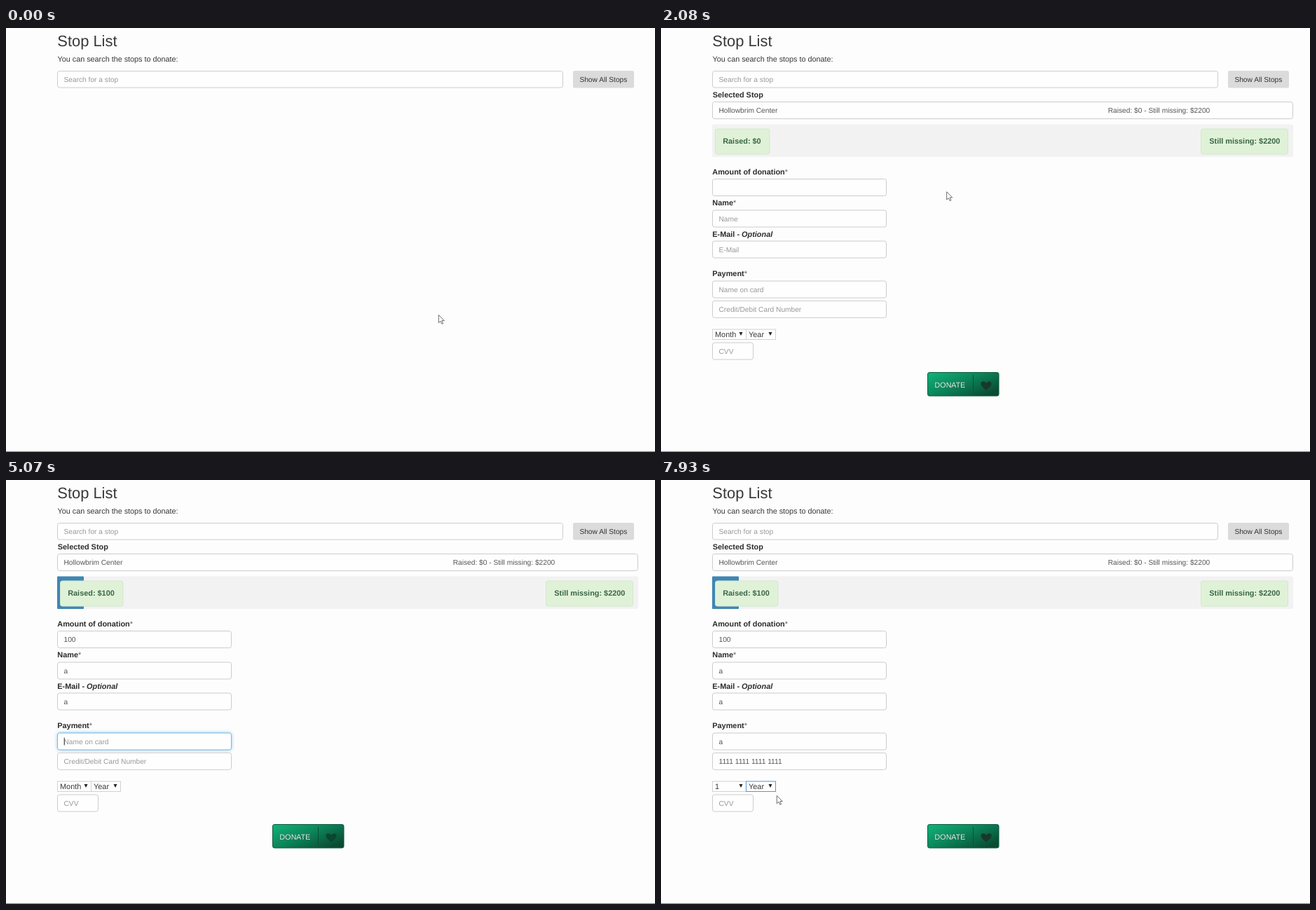
These frames come from a looping animation (926x605 px, 8 s). An HTML page:

```html
<!DOCTYPE html>
<html lang="en">
<head>
<meta charset="utf-8">
<title>Stop List</title>
<style>
  html, body { margin: 0; width: 100%; height: 100%; overflow: hidden; background: #fdfdfd; }
  svg { display: block; width: 926px; height: 605px; }
  text {
    font: 10.9px "Liberation Sans", Arial, sans-serif; fill: #383838;
    white-space: pre; text-rendering: geometricPrecision;
  }
  .title { font-size: 21.9px; }
  .lead { font-size: 10.82px; }
  .small { font-size: 10.2px; fill: #555; }
  .hint { font-size: 10.2px; fill: #999; }
  .bold { font-weight: bold; fill: #2c2c2c; }
  .star { font-weight: normal; fill: #54606c; }
  .badge { font-weight: bold; fill: #3b6446; }
  .field { fill: #fefefe; stroke: #ccc; }
  .field.focus { stroke: #74bbda; filter: drop-shadow(0 0 2.5px rgba(102, 175, 233, .65)); }
  .select { fill: #fefefe; stroke: #d2d2d2; }
  .select.focus { stroke: #5b95cf; }
  .donate { font-size: 10.7px; }
</style>
</head>
<body>
<svg id="stage" viewBox="0 0 926 605">
  <defs>
    <linearGradient id="green" x1="0" y1="0" x2="1" y2=".75">
      <stop offset="0" stop-color="#0fb47a"/>
      <stop offset=".5" stop-color="#0c855b"/>
      <stop offset="1" stop-color="#0a4b33"/>
    </linearGradient>
  </defs>
</svg>
<script>
const LOOP = 8000, STEP = 130;
const ROW_TOP = 85.5, ROW_HEIGHT = 34.93;
const SHOW_LIST = 650, BLUR_BUTTON = 1560, SHOW_FORM = 1690;

const stops = [
  ["Velto at Darnwel Blvd", 1200], ["Thornwick Center Mall", 1400],
  ["Torvena Textile", 1100], ["Calveron Orlenta", 1700],
  ["Hollowbrim Center", 2200], ["Selvio Arts Center", 3100],
  ["Far View Orlenta", 2500], ["Brindellow Park", 700],
  ["Foltrune Plaza", 1900], ["Amber Orbane Market", 2700]
];
const chosen = stops[4];

const stage = document.getElementById("stage");

function add(parent, tag, attrs = {}, content = "") {
  const node = document.createElementNS("http://www.w3.org/2000/svg", tag);
  for (const key in attrs) node.setAttribute(key, attrs[key]);
  node.textContent = content;
  parent.append(node);
  return node;
}
const label = (parent, x, y, content, cls = "", anchor = "start") =>
  add(parent, "text", { x, y, class: cls, "text-anchor": anchor }, content);
const box = (parent, left, top, right, bottom, attrs) =>
  add(parent, "rect", { x: left, y: top, width: right - left, height: bottom - top, ...attrs });
const show = (node, on) => node.setAttribute("visibility", on ? "visible" : "hidden");
const summary = missing => `Raised: $0 - Still missing: $${missing}`;
const rowTop = i => ROW_TOP + i * ROW_HEIGHT;

// Header
label(stage, 73.3, 25.7, "Stop List", "title");
label(stage, 73.5, 47.8, "You can search the stops to donate:", "lead");
box(stage, 73.5, 61.5, 794.5, 85, { rx: 3, class: "field" });
label(stage, 82.5, 76.7, "Search for a stop", "hint");
box(stage, 809, 61, 896, 85.5, { rx: 2.5, fill: "#dbdbdb" });
const showAllRing = box(stage, 808.5, 60.5, 896.5, 85.5, { rx: 1, fill: "#dadada", stroke: "#86aedb" });
label(stage, 852.4, 76.7, "Show All Stops", "small", "middle").style.fill = "#333";
box(stage, 0, 604, 926, 605, { fill: "#7d7d7d" });

// Stop list
const list = add(stage, "g");
box(list, 73.5, 85.5, 901.5, 434.7, { rx: 3, fill: "none", stroke: "#ddd" });
for (let i = 1; i < stops.length; i++) {
  const y = Math.round(rowTop(i));
  box(list, 74, y, 901.5, y + 1, { fill: "#ddd" });
}
const hover = box(list, 74, 0, 901.5, 35, { fill: "#afdce2" });
stops.forEach(([name, missing], i) => {
  label(list, 85, rowTop(i) + 18.3, name);
  label(list, 781.7, rowTop(i) + 15.9, summary(missing), "", "end");
});

// Donation form
const form = add(stage, "g");
label(form, 73.8, 99.4, "Selected Stop", "bold");
box(form, 73.5, 105.5, 901.5, 129.5, { rx: 3, class: "field" });
label(form, 82.5, 121.3, chosen[0], "small");
label(form, 637.7, 121.3, summary(chosen[1]), "small");

box(form, 73, 137.5, 902, 184, { rx: 2, fill: "#f2f2f2" });
const bar = box(form, 73, 137.5, 73, 184, { rx: 1, fill: "#3f86b5" });
const badgeStyle = { rx: 3, fill: "#dff2d7", stroke: "#d3e8ca" };
const raisedBadge = box(form, 77.5, 144, 155, 180, badgeStyle);
const raisedText = label(form, 88.2, 165.4, "", "badge");
box(form, 770.5, 144, 894.5, 180, badgeStyle);
label(form, 782.3, 165.4, `Still missing: $${chosen[1]}`, "badge");

function heading(y, content, extra, attrs) {
  const node = label(form, 73.3, y, content, "bold");
  add(node, "tspan", attrs, extra);
}
const star = { class: "star" };
heading(209, "Amount of donation", "*", star);
heading(253.4, "Name", "*", star);
heading(297.8, "E-Mail - ", "Optional", { "font-style": "italic" });
heading(354.4, "Payment", "*", star);

const digits = n => "1".repeat(n).replace(/(.{4})(?=.)/g, "$1 ");
const typedCard = Array.from({ length: 16 }, (_, i) => [5980 + i * 60, digits(i + 1)]);

// Each field: top edge, hint, time of focus and blur, typed values by time
const fields = [
  { top: 215.5, hint: "", from: 2600, to: 3770, typed: [[3120, "1"], [3380, "10"], [3510, "100"]] },
  { top: 260, hint: "Name", from: 3770, to: 4160, typed: [[3900, "a"]] },
  { top: 304, hint: "E-Mail", from: 4160, to: 4940, typed: [[4550, "a"]] },
  { top: 361, hint: "Name on card", from: 4940, to: 5590, typed: [[5330, "a"]] },
  { top: 389.3, hint: "Credit/Debit Card Number", from: 5590, to: 7020, typed: typedCard },
  { top: 449, hint: "CVV", from: LOOP, to: LOOP, typed: [], right: 131.5 }
];
for (const f of fields) {
  f.rect = box(form, 73.5, f.top, f.right || 321.5, f.top + 24, { rx: 3 });
  f.text = label(form, 82.5, f.top + 15.6, "");
}
const caret = add(form, "rect", { width: 1, height: 11, fill: "#333" });

function select(left, right, content) {
  const rect = box(form, left, 430, right, 444.5);
  const text = label(form, left + 3.5, 441, content);
  add(form, "path", { d: `M${right - 10} 434h5l-2.5 5z`, fill: "#222" });
  return { rect, text };
}
const month = select(73.5, 121.5, "Month");
const year = select(121.5, 163.5, "Year");

box(form, 380.5, 491.5, 482, 525, { rx: 2.5, fill: "url(#green)", stroke: "#0b5a3e" });
box(form, 445, 495, 446, 522, { fill: "#0a5138" });
label(form, 391.3, 513.3, "DONATE", "donate").style.fill = "#0a4a33";
label(form, 390.6, 512.6, "DONATE", "donate").style.fill = "#f2fbf6";
const heart = add(form, "path", {
  d: "M464 517C460 513 456.5 511 456.5 507.5C456.5 503.5 462 503 464 507C466 503 471.5 503.5 471.5 507.5C471.5 511 468 513 464 517Z"
});

// Pointer
const arrow = add(stage, "path", {
  d: "M0 0V11.3L2.7 8.9L4.5 12.9L6.3 12.1L4.5 8.2H8Z",
  fill: "#fff", stroke: "#4a4a4a", "stroke-width": .8
});
const beam = add(stage, "path", { d: "M-2 0H2M0 0V12M-2 12H2", fill: "none", stroke: "#333" });

const pointerKeys = [
  [0, 617.3, 409.4], [520, 850, 73], [650, 850, 73], [910, 693.3, 204.2],
  [1300, 610.3, 246.4], [1820, 610.3, 246.4], [2340, 205, 221], [7540, 205, 221],
  [7670, 190, 330], [7930, 165.3, 450.4]
];

function pointerAt(t) {
  const i = Math.max(1, pointerKeys.findIndex(k => k[0] >= t));
  const [t0, x0, y0] = pointerKeys[i - 1], [t1, x1, y1] = pointerKeys[i];
  const p = (t - t0) / (t1 - t0), e = p * p * (3 - 2 * p);
  return { x: x0 + (x1 - x0) * e, y: y0 + (y1 - y0) * e };
}

function latest(entries, t, initial) {
  return entries.reduce((value, [at, next]) => at <= t ? next : value, initial);
}

function drawFields(t) {
  show(caret, false);
  for (const f of fields) {
    const value = latest(f.typed, t, ""), focused = t >= f.from && t < f.to;
    f.rect.setAttribute("class", focused ? "field focus" : "field");
    f.text.setAttribute("class", value ? "small" : "hint");
    f.text.textContent = value || f.hint;
    if (!focused) continue;
    const since = t - f.typed.reduce((last, [at]) => at <= t ? at : last, f.from);
    caret.setAttribute("x", 82.7 + (value ? f.text.getComputedTextLength() : 0));
    caret.setAttribute("y", f.top + 6.5);
    show(caret, since % 1000 < 500);
  }
}

function drawProgress(t) {
  const raised = latest(fields[0].typed, t, "0");
  const p = Math.min(1, Math.max(0, (t - 3510) / 600));
  bar.setAttribute("width", 38 * (1 - (1 - p) ** 3));
  raisedText.textContent = `Raised: $${raised}`;
  raisedBadge.setAttribute("width", 77.3 + 6.06 * (raised.length - 1));
}

function render(time) {
  const t = Math.floor(time / STEP) * STEP;
  const { x, y } = pointerAt(t);
  const listed = t >= SHOW_LIST && t < SHOW_FORM;
  const row = Math.floor((y - ROW_TOP) / ROW_HEIGHT);

  list.style.display = listed ? "" : "none";
  form.style.display = t >= SHOW_FORM ? "" : "none";
  show(showAllRing, t >= SHOW_LIST && t < BLUR_BUTTON);
  hover.setAttribute("y", Math.round(rowTop(row)) + .5);
  hover.setAttribute("opacity", row >= 0 && row < stops.length ? 1 : 0);

  drawFields(t);
  drawProgress(t);
  month.text.textContent = t >= 7410 ? "1" : "Month";
  month.rect.setAttribute("class", t >= 7020 && t < 7670 ? "select focus" : "select");
  year.rect.setAttribute("class", t >= 7670 ? "select focus" : "select");
  heart.setAttribute("fill", t < 3900 || t >= 7020 ? "#17392c" : "#0b4631");

  const visible = t < 3120 || t >= 7670;
  const overField = t >= SHOW_FORM && t < 3120 && x < 322 && y > 209 && y < 240;
  for (const node of [arrow, beam]) node.setAttribute("transform", `translate(${x} ${y})`);
  show(arrow, visible && !overField);
  show(beam, visible && overField);
}

const start = performance.now();
function tick() {
  render((performance.now() - start) % LOOP);
  requestAnimationFrame(tick);
}
tick();
</script>
</body>
</html>
```
